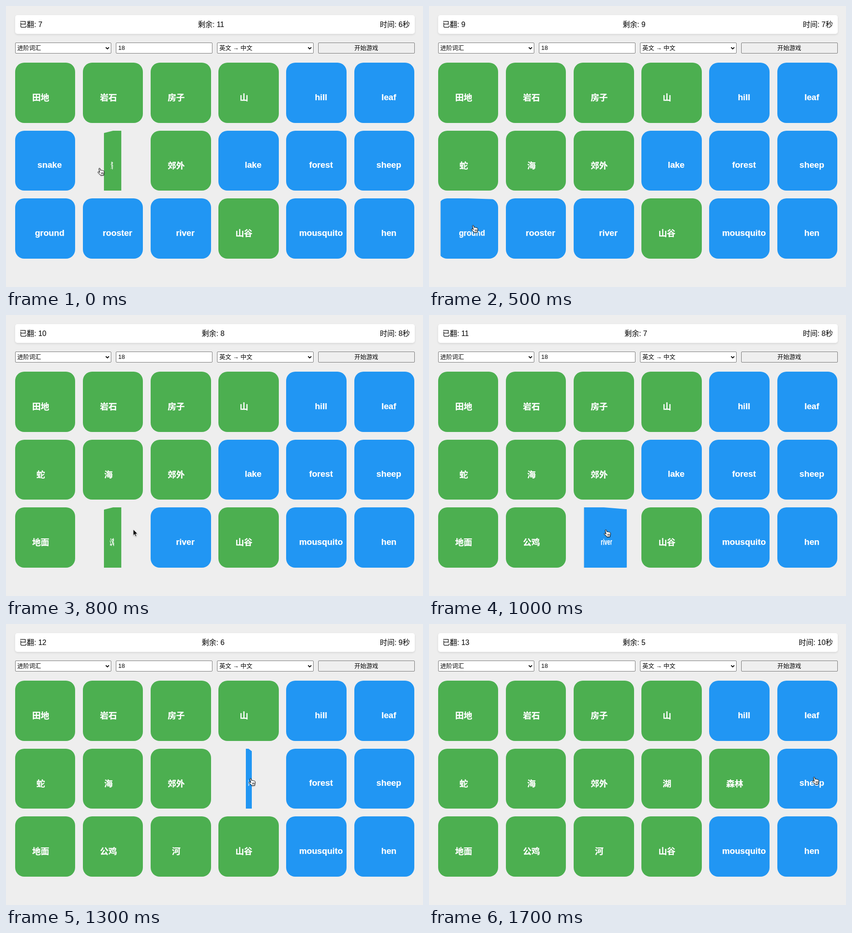
An HTML page that plays this animation: 911x615 px, repeating every 1.8 s.

```html
<!DOCTYPE html>
<html lang="zh-CN">
<head>
<meta charset="utf-8">
<title>单词翻牌</title>
<style>
  html, body { margin: 0; width: 100%; height: 100%; overflow: hidden; background: #eee; }
  body { position: relative; font: 16px "Liberation Sans", "Noto Sans CJK SC", sans-serif; color: #000; }
  body > * { position: absolute; box-sizing: border-box; }
  .stats {
    left: 19.5px; top: 20px; width: 873px; height: 40.5px; padding: 0 10px 2px;
    display: flex; justify-content: space-between; align-items: center;
    background: #fff; border-radius: 5px; box-shadow: 0 2px 4px rgba(0, 0, 0, .1);
  }
  .controls {
    left: 19.5px; top: 80px; width: 873px; height: 24px;
    display: grid; grid-template-columns: repeat(4, 1fr); gap: 10px;
  }
  .field {
    position: relative; padding: 0 4px; line-height: 22px;
    font-size: 13px; white-space: pre; background: #fff; border: 1px solid #767676; border-radius: 2px;
  }
  .field svg { position: absolute; right: 3px; top: 8px; }
  .button { text-align: center; background: #efefef; }
  .card {
    width: 131.75px; height: 131.6px; border-radius: 20px; overflow: hidden; perspective: 1000px;
  }
  .inner { width: 100%; height: 100%; position: relative; transform-style: preserve-3d; }
  .face {
    position: absolute; left: 0; top: 0; width: 100%; height: 100%; padding: 10px;
    display: flex; align-items: center; justify-content: center;
    font-size: 18.72px; font-weight: bold; color: #fff; background: #2196f3;
    -webkit-text-stroke: .25px #fff;
    backface-visibility: hidden; box-shadow: 0 2px 4px rgba(0, 0, 0, .1);
  }
  .back { padding: 8.5px 10px 11.5px; background: #4caf50; transform: rotateY(180deg); }
  .cursor { left: 0; top: 0; overflow: visible; filter: drop-shadow(0 1px 1px rgba(0, 0, 0, .3)); }
</style>
</head>
<body>
<div class="stats"><span id="done"></span><span id="left"></span><span id="time"></span></div>
<div class="controls">
  <div class="field">进阶词汇<svg width="9" height="7"><path d="M1 1.5l3.5 3.5 3.5-3.5" fill="none" stroke="#000" stroke-width="1.8"/></svg></div>
  <div class="field">18</div>
  <div class="field">英文 → 中文<svg width="9" height="7"><path d="M1 1.5l3.5 3.5 3.5-3.5" fill="none" stroke="#000" stroke-width="1.8"/></svg></div>
  <div class="field button">开始游戏</div>
</div>
<svg class="cursor" id="cursor" width="16" height="19" stroke-linejoin="round" stroke-linecap="round">
  <g id="hand" fill="#fff" stroke="#000">
    <path d="M3 2.2C2.8.6 4.9.3 5.4 1.9L6.8 6C7.2 5 9 5 9.4 6.2 10 5.4 11.5 5.6 11.9 6.8 12.9 6.2 14.2 7 14.4 8.2 14.8 10.5 14.3 12 13.8 13.2L13.5 16.3 7 16.8C6.5 15 3 12.6 1 10.4.2 9.2 1.8 8.2 3 9L4.7 10.4Z"/>
    <path d="M8.3 10.5l.3 3.5M10.3 10.3l.2 3.5M12.2 10v3.5" stroke-width=".8"/>
  </g>
  <path id="arrow" d="M1 .5V13.5L4 10.8 6 15.6 8.2 14.7 6.2 10H10.2Z" fill="#000" stroke="#fff" stroke-width=".9"/>
</svg>
<script>
const LOOP = 1800, STEP = 100, FLIP = 250, OPEN = -1e4;
// front word, back word, time of the click that flips the card
const words = [
  ['field', '田地', OPEN], ['rock', '岩石', OPEN], ['house', '房子', OPEN],
  ['mountain', '山', OPEN], ['hill', '小山'], ['leaf', '叶子'],
  ['snake', '蛇', 175], ['sea', '海', -84], ['suburb', '郊外', OPEN],
  ['lake', '湖', 1230], ['forest', '森林', 1440], ['sheep', '绵羊'],
  ['ground', '地面', 467], ['rooster', '公鸡', 716], ['river', '河', 951],
  ['valley', '山谷', OPEN], ['mousquito', '蚊子'], ['hen', '母鸡']
];
// time, x, y
const path = [
  [0, 200, 354], [200, 70, 349], [500, 92, 479], [800, 277, 469],
  [1000, 382, 469], [1300, 530, 337], [1700, 837, 334]
];
const $ = id => document.getElementById(id);

const cards = words.map(([front, back, click = Infinity], i) => {
  const card = document.createElement('div');
  card.className = 'card';
  card.style.left = 19.5 + 148.2 * (i % 6) + 'px';
  card.style.top = 124.2 + 148.4 * Math.floor(i / 6) + 'px';
  card.innerHTML = `<div class="inner"><div class="face">${front}</div><div class="face back">${back}</div></div>`;
  $('cursor').before(card);
  return { inner: card.firstChild, click };
});

// cubic-bezier(.25, .1, .25, 1)
function ease(x) {
  if (x <= 0 || x >= 1) return x <= 0 ? 0 : 1;
  const bezier = (s, a, b) => 3 * s * (1 - s) ** 2 * a + 3 * s * s * (1 - s) * b + s ** 3;
  let lo = 0, hi = 1;
  for (let i = 0; i < 20; i++) {
    const mid = (lo + hi) / 2;
    if (bezier(mid, .25, .25) < x) lo = mid; else hi = mid;
  }
  return bezier(lo, .1, 1);
}

function cursorAt(t) {
  const next = path.findIndex(p => p[0] > t);
  if (next < 0) return path[path.length - 1].slice(1);
  const [t0, x0, y0] = path[next - 1], [t1, x1, y1] = path[next];
  const k = (t - t0) / (t1 - t0);
  return [x0 + (x1 - x0) * k, y0 + (y1 - y0) * k];
}

function draw(t) {
  for (const { inner, click } of cards) {
    const turn = 180 * ease((t - click) / FLIP);
    inner.style.transform = turn ? `rotateY(${turn}deg)` : 'none';
  }
  const done = cards.filter(c => c.click <= t).length;
  $('done').textContent = `已翻: ${done}`;
  $('left').textContent = `剩余: ${cards.length - done}`;
  $('time').textContent = `时间: ${6 + Math.floor((t + 400) / 500)}秒`;

  const [x, y] = cursorAt(t), isArrow = t >= 800 && t < 900;
  $('cursor').style.transform = `translate(${x}px, ${y}px)`;
  $('hand').style.display = isArrow ? 'none' : '';
  $('arrow').style.display = isArrow ? '' : 'none';
}

let start, shown;
function tick(now) {
  start ??= now;
  const t = Math.floor((now - start) % LOOP / STEP) * STEP;
  if (t !== shown) draw(shown = t);
  requestAnimationFrame(tick);
}
draw(0);
requestAnimationFrame(tick);
</script>
</body>
</html>
```
